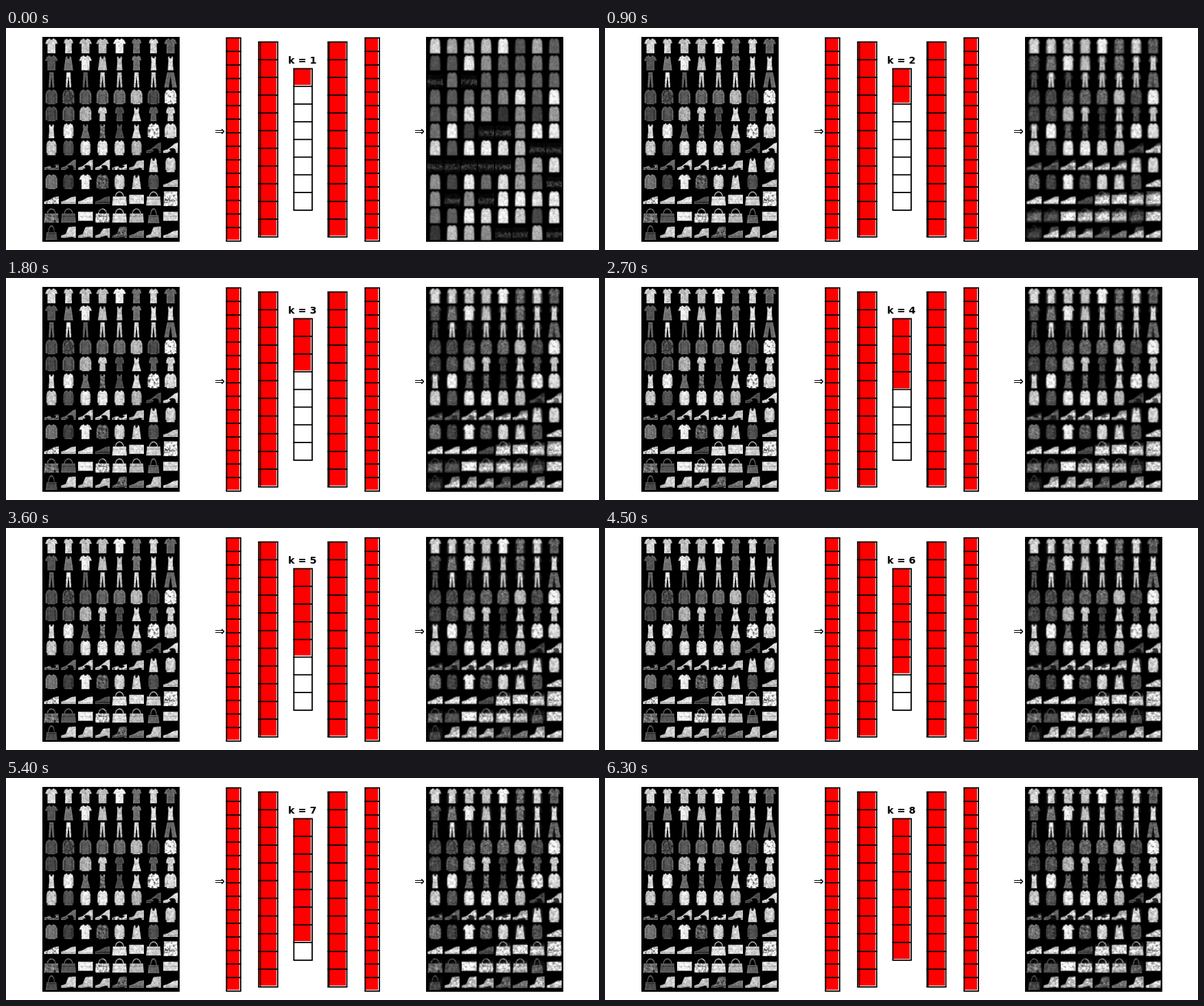
Write a matplotlib script that moves like this. It is 864x324 px and loops after 7500 ms.

```python
import numpy as np
import matplotlib.pyplot as plt
from matplotlib.animation import FuncAnimation
from matplotlib.patches import Rectangle

W, H, DPI = 864, 324, 72
N, PITCH, STEPS = 28, 30, 8

# Contents of the sheet, one letter per item; lower case marks dark items.
LAYOUT = """
TSTTTsSt tkTKDsDD pPpPPPPh wwwwwWwW wwWEeFeE DCfdfFWW
CcCCCClL zlLLZGKC wcTwCKcN NNNnMAMQ mmAMMMuA uBBGbnBN
""".split()
SHOES, BAGS, SLIM = "NBLZG", "MAQU", "DFEP"

FINE = (np.arange(N * 3) + .5) / 3
FX, FY = np.meshgrid(FINE, FINE)
X, Y = np.meshgrid(np.arange(N) + .5, np.arange(N) + .5)
SIDE = abs(FX - 14)


def ellipse(x, y, rx, ry):
    return np.hypot((FX - x) / rx, (FY - y) / ry)


def garment(shoulder, waist, hem, sleeve=0, reach=0, depth=2):
    width = np.interp(FY, [1, 4, 12, 27], [shoulder - 3, shoulder, waist, hem])
    body = (SIDE < width) & (FY > 1) & (FY < 27)
    drop = np.clip((FY - 2) / 7, 0, 1)
    arm = abs(SIDE - shoulder + 2 - (reach - shoulder) * drop) < 1.8
    arm &= (FY > 2.5) & (FY < sleeve)
    return (body | arm) & (ellipse(14, 1, 2.5, depth) > 1)


def trousers(hip, leg, gap):
    outer = np.interp(FY, [1, 27], [hip, leg])
    inner = np.interp(FY, [7, 12, 27], [0, gap / 3, gap])
    return (SIDE < outer) & (SIDE >= inner) & (FY > .5) & (FY < 27.5)


def shoe(instep, collar, heel=0, cutout=False):
    top = np.interp(FX, [1, 9, instep, 26], [19, 16.5, collar + 1, collar])
    sole = 23 - np.interp(FX, [8, 20, 23, 23.5], [0, heel, heel * .8, 0])
    mask = (FY > top) & (FY < sole) & (FX > 1) & (FX < 27)
    return mask & (ellipse(17, 17, 5, 2.5) > 1) if cutout else mask


def bag(top, bottom, half, flare=0, handle=0):
    width = half + flare * (FY - top) / (bottom - top)
    mask = (SIDE < width) & (FY > top) & (FY < bottom)
    if handle:
        mask |= (abs(ellipse(14, top, half * .6, handle) - 1) < .1) & (FY < top)
    return mask


SHAPES = {
    "T": garment(7.5, 7, 7, 10.5, 11),
    "S": garment(6.5, 5.5, 6, 9.5, 8.5),
    "W": garment(7.5, 6.8, 7, 25, 10.5),
    "C": garment(7, 6.5, 7.5, 23, 9),
    "K": garment(5, 6, 8, depth=6),
    "D": garment(4.5, 3.8, 5, depth=5),
    "F": garment(4.5, 4, 8, depth=5),
    "E": garment(5.5, 4.5, 5.5, 13, 8),
    "P": trousers(3.6, 4.8, 1.8),
    "H": trousers(6, 11, 3),
    "O": garment(8, 8.8, 9, depth=1),
    "N": shoe(19, 10),
    "B": shoe(14, 3, 1.5),
    "G": shoe(15, 6, 4),
    "L": shoe(22, 5, 7, True),
    "Z": shoe(22, 13, 0, True),
    "M": bag(10, 26, 11.5, 1.5, 8),
    "U": bag(13, 27, 8.5, 1.5, 11),
    "A": bag(7, 23, 13),
    "Q": bag(1, 27, 11.5, 1),
}
SHAPES = {kind: mask.reshape(N, 3, N, 3).mean(axis=(1, 3))
          for kind, mask in SHAPES.items()}


def blur(img, sigma):
    d = np.subtract.outer(np.arange(N), np.arange(N))
    kernel = np.exp(-d ** 2 / (2 * sigma ** 2))
    kernel /= kernel.sum(axis=1, keepdims=True)
    return kernel @ img @ kernel.T


def grain(rng, sigma):
    noise = blur(rng.normal(size=(N, N)), sigma)
    return noise / noise.std()


def describe(r, c):
    """Kind, shape, brightness and private random generator of one item."""
    letter = LAYOUT[r][c]
    kind = letter.upper()
    rng = np.random.default_rng(8 * r + c)
    tone = (.8 if letter == kind else .34) + rng.uniform(-.1, .12)
    return kind, SHAPES[kind], tone, rng


def item(r, c):
    kind, shape, tone, rng = describe(r, c)
    printed = rng.random() < .15
    edge = 1 - blur(shape, 1.3)
    shade = tone * (1 + (.3 if printed else .08) * grain(rng, .8))
    shade += .25 * edge * (tone < .6)
    if kind in "WC":
        shade -= .15 * np.exp(-((abs(X - 14) - 6.3) / .7) ** 2) * (Y > 8)
    elif kind in SHOES:
        shade -= .2 * np.exp(-((Y - 20.5) / .8) ** 2)
    elif kind in BAGS:
        shade -= .15 * np.exp(-((Y - 15) / .8) ** 2)
    return np.clip(shade, .06, 1) * shape


def typical(kind):
    if kind in SLIM:
        return .6 * SHAPES["E"] + .4 * SHAPES["P"]
    if kind in SHOES:
        return SHAPES["N"]
    if kind in BAGS:
        return .6 * SHAPES["A"] + .4 * SHAPES["B"]
    return SHAPES["O"]


def single_code(r, c):
    """With one number only the overall brightness survives."""
    kind, shape, tone, rng = describe(r, c)
    level = min(2 * tone * shape.mean(), .92)
    if level < .2 or kind in SHOES and level < .5:
        img = .15 * np.exp(-((Y - 18) / 5) ** 4) + .03 * (Y > 5)
        return np.clip(img * (1 + .35 * grain(rng, 1)), 0, 1)
    body = level * blur(SHAPES["O"], .9)
    return np.clip(body * (1 + .06 * grain(rng, 1)), 0, 1)


def rebuilt(r, c, k):
    """Mix of the item and its group's typical shape, sharper as k grows."""
    if k == 1:
        return single_code(r, c)
    kind, shape, tone, rng = describe(r, c)
    own = 1 - 1.3 / k
    detail = .25 + .06 * k
    sharp = detail * item(r, c) + (1 - detail) * tone * shape
    img = own * blur(sharp, 1 - .06 * k) + (1 - own) * tone * blur(typical(kind), 1)
    rough = .13 if tone < .5 or kind in SHOES + BAGS else .06
    return np.clip(img * (1 + rough * grain(rng, .9)), 0, 1)


def mosaic(make):
    sheet = np.zeros((len(LAYOUT) * PITCH + 2, 8 * PITCH + 2))
    for r, c in np.ndindex(len(LAYOUT), 8):
        y, x = 2 + r * PITCH, 2 + c * PITCH
        sheet[y:y + N, x:x + N] = make(r, c)
    return sheet


OUTPUTS = [mosaic(lambda r, c: rebuilt(r, c, k)) for k in range(1, STEPS + 1)]

fig = plt.figure(figsize=(W / DPI, H / DPI), dpi=DPI, facecolor="white")
ax = fig.add_axes([0, 0, 1, 1])


def panel(left, sheet):
    return ax.imshow(sheet, cmap="gray", vmin=0, vmax=1, aspect="auto",
                     extent=(left, left + 199.5, 311.7, 13))


def layer(x0, x1, y0, y1, cells, seam=0):
    """A red bar behind a stack of outlined cells."""
    bar = ax.add_patch(Rectangle((x0, y0), x1 - x0 - 2, y1 - y0 - 2,
                                 fc="red", ec="none", zorder=2))
    style = dict(color="k", lw=1.8, zorder=3, snap=False)
    ax.hlines(np.linspace(y0, y1, cells + 1), x0 - .9, x1 + .9, **style)
    ax.vlines([x0, x1], y0, y1, **style)
    if seam:
        ax.vlines(x0 + seam, y0, y1, **{**style, "lw": 1.2})
    return bar


panel(53.3, mosaic(item))
output = panel(612.3, OUTPUTS[0])
CODE_TOP, CODE_BOTTOM = 59.4, 265.9
layer(321.3, 341.9, 14.4, 311, 15)
layer(368.2, 395.8, 20.4, 304.9, 11, seam=2.6)
code_bar = layer(419.4, 446.1, CODE_TOP, CODE_BOTTOM, STEPS)
layer(469.3, 496.6, 20.4, 304.9, 11, seam=1.6)
layer(523.3, 544.1, 14.4, 311, 15)

for x in (311.7, 602.7):
    ax.text(x, 157, "⇒", fontsize=18, ha="center", va="baseline",
            family="DejaVu Sans")
title = ax.text(432, 52, "", fontsize=14.4, weight="bold", ha="center",
                va="baseline", family="DejaVu Sans")
ax.set(xlim=(0, W), ylim=(H, 0))
ax.axis("off")


def update(frame):
    k = min(frame // 3, STEPS - 1) + 1
    title.set_text(f"k = {k}")
    code_bar.set_height((CODE_BOTTOM - CODE_TOP) * k / STEPS - 2)
    output.set_data(OUTPUTS[k - 1])
    return title, code_bar, output


anim = FuncAnimation(fig, update, frames=25, interval=300, repeat=True, blit=False)
plt.show()
```
